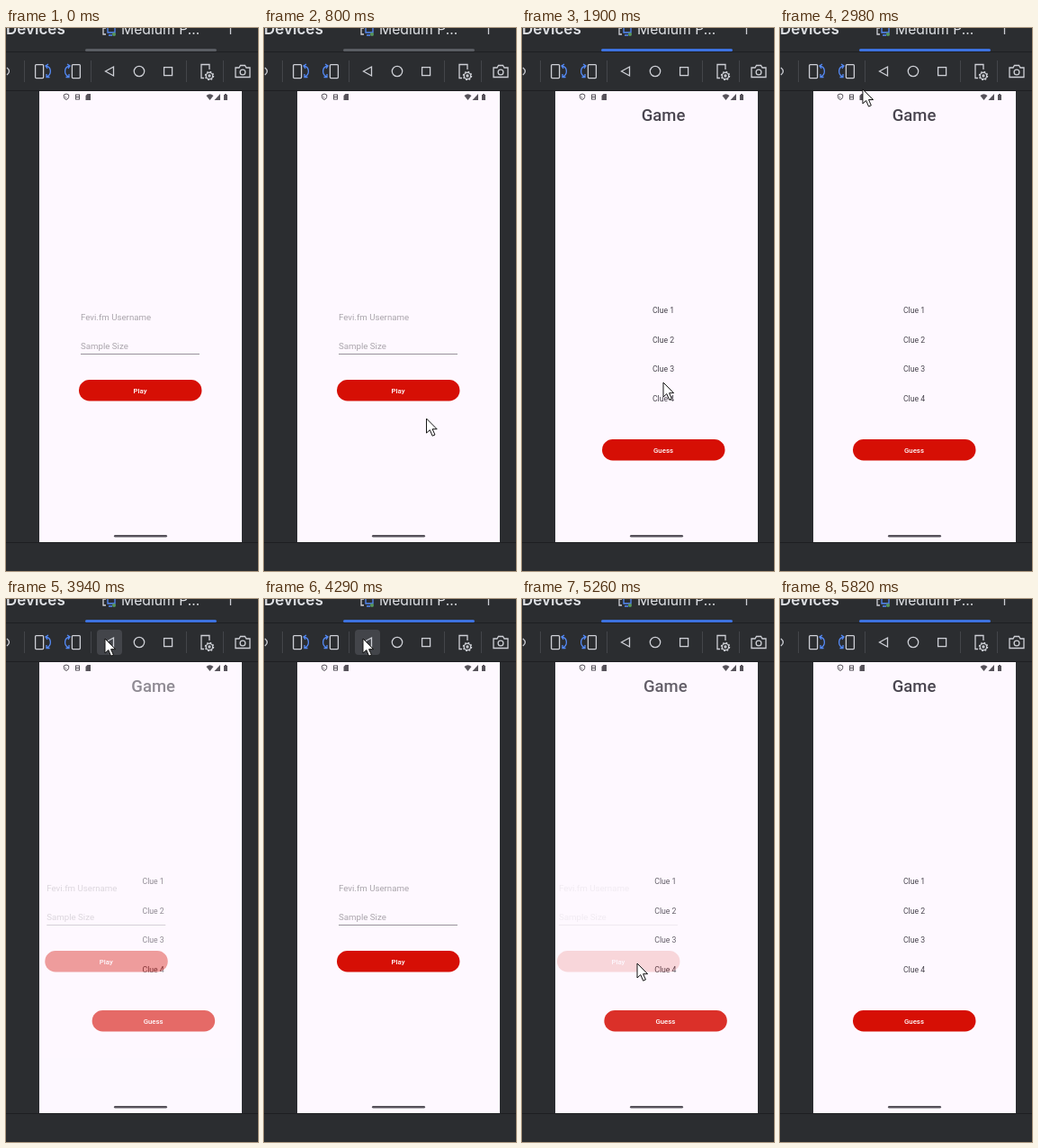
Write an HTML page that moves like this. It is 280 px wide and 602 px high and loops after 6.55 s.

```html
<!DOCTYPE html>
<html lang="en">
<head>
<meta charset="utf-8">
<title>Emulator demo</title>
<style>
  html, body { margin: 0; height: 100%; overflow: hidden; background: #2b2d30; }
  svg { display: block; }
  text { font-family: Roboto, "Noto Sans", sans-serif; }
  .ide { font-family: Inter, "Open Sans", sans-serif; fill: #dfe1e5; }
  .icon { fill: none; stroke: #ced0d6; stroke-width: 1.3; }
  .blue { stroke: #548af7; }
  .hint { font-size: 9.7px; fill: #aaa5ac; }
  .mid { text-anchor: middle; fill: #49454f; }
  .clue { font-size: 8.7px; }
  .label { font-size: 7.8px; font-weight: 500; fill: #fff; text-anchor: middle; }
  .button { fill: #d60f05; }
</style>
</head>
<body>
<svg width="280" height="602" viewBox="0 0 280 602">
  <defs>
    <clipPath id="screen"><rect x="37" y="70" width="225" height="500"/></clipPath>
  </defs>
  <rect width="280" height="602" fill="#2b2d30"/>

  <!-- Tab strip -->
  <text class="ide" x="0" y="7" font-size="17" font-weight="600">Devices</text>
  <text class="ide" x="128" y="7" font-size="15.7">Medium P...</text>
  <g class="icon">
    <path d="M111 0H108V7H111M249.5 0V7"/>
    <path class="blue" d="M113 0V5H121V0M114 8H118"/>
  </g>
  <circle cx="120" cy="7" r="2" fill="#57965c"/>
  <rect id="tabLine" x="88" y="23" width="146" height="3" rx="1.5"/>
  <path d="M0 26.5H280M0 69.5H280M0 570.5H280" stroke="#1e1f22"/>

  <!-- Toolbar -->
  <g fill="#43454a">
    <rect id="hoverRotate" x="60" y="34" width="28" height="28" rx="4"/>
    <rect id="hoverBack" x="101" y="34" width="28" height="28" rx="4"/>
  </g>
  <path d="M20.5 36V60M94.5 36V60M200.5 36V60M241.5 36V60" stroke="#43454a"/>
  <g class="icon">
    <path d="M1 44Q6 48 1 52"/>
    <rect x="32.6" y="40.6" width="9" height="15" rx="1"/>
    <rect x="73.4" y="40.6" width="9" height="15" rx="1"/>
    <path class="blue" d="M44 42C51 43 51 52 45 54M47 40L44 42L46 45M45 51V54.5H48.500"/>
    <path class="blue" d="M71 42C64 43 64 52 70 54M68 40L71 42L69 45M70 51V54.5H66.500"/>
    <path d="M119.500 43V53L110.500 48Z"/>
    <circle cx="148" cy="48" r="5.700"/>
    <rect x="175.600" y="43.600" width="9" height="9"/>
    <path d="M220 55.500H217V40.500H226V46"/>
    <circle cx="226" cy="53" r="3.700"/>
    <circle cx="226" cy="53" r="1"/>
    <circle cx="226" cy="53" r="4.600" stroke-dasharray="1.800 1.800"/>
    <path d="M255 44H259L260.500 41.500H265.500L267 44H271V54.500H255Z"/>
    <circle cx="263" cy="49" r="2.900"/>
  </g>

  <!-- Phone -->
  <g clip-path="url(#screen)">
    <rect x="37" y="70" width="225" height="500" fill="#fef8ff"/>
    <g id="playPage">
      <text class="hint" x="83" y="323.500">Fevi.fm Username</text>
      <text class="hint" x="83" y="356">Sample Size</text>
      <path d="M83 361.500H215" stroke="#98939b"/>
      <rect class="button" x="81" y="390" width="136.500" height="23.500" rx="11.750"/>
      <text class="label" x="149" y="404.700">Play</text>
    </g>
    <g id="gameLayer">
      <rect x="37" y="70" width="225" height="500" fill="#fef8ff"/>
      <g id="gamePage">
        <text class="mid" x="149" y="103" font-size="18.500" font-weight="500">Game</text>
        <text class="mid clue" x="149" y="316">Clue 1</text>
        <text class="mid clue" x="149" y="348.700">Clue 2</text>
        <text class="mid clue" x="149" y="381.400">Clue 3</text>
        <text class="mid clue" x="149" y="414">Clue 4</text>
        <rect class="button" x="81" y="456" width="136.500" height="23.500" rx="11.750"/>
        <text class="label" x="149" y="470.500">Guess</text>
      </g>
    </g>
    <g fill="none" stroke="#56525a">
      <path d="M67 73L69.700 74V76.500Q69.500 78.500 67 79.500Q64.500 78.500 64.300 76.500V74ZM65.500 76L67 77.500"/>
      <rect x="77.500" y="74" width="4" height="5"/>
      <path d="M78 76.500H81"/>
    </g>
    <g fill="#56525a">
      <path d="M88.500 75L90.500 73H94V80H88.500Z"/>
      <path d="M222.500 75Q226.500 71.500 230.500 75L226.500 80Z"/>
      <path d="M238 73V80H231.500Z"/>
      <path d="M242 74H243V73H245V74H246V80H242Z"/>
      <rect x="120" y="562" width="59" height="2.600" rx="1.300"/>
    </g>
  </g>

  <g id="pointer">
    <path d="M0 0V16L3.800 12.600L6.600 19.200L9.400 18L6.600 11.700H11.600Z" fill="#fff" stroke="#111"/>
    <circle id="press" cy="1" r="15" fill="#ff0" fill-opacity=".47"/>
  </g>
</svg>
<script>
const LOOP = 6550, SLIDE = 450, SHIFT = 52.4;
const $ = id => document.getElementById(id);
const clamp = v => Math.min(1, Math.max(0, v));
const within = (t, a, b) => t >= a && t < b;
const show = (id, on) => $(id).style.display = on ? '' : 'none';

// Pointer stops: time, x, y
const stops = [
  [450, 220, 548], [660, 198, 480], [870, 172, 410], [990, 162, 388],
  [1080, 159, 392], [1150, 157, 393], [2520, 157, 393], [2700, 140, 290],
  [2850, 110, 140], [2980, 92, 68], [3120, 80, 44], [3340, 80, 44],
  [3600, 110, 44], [4400, 110, 44], [4560, 113, 150], [4690, 122, 340],
  [4800, 128, 404], [5740, 128, 404], [5750, 199, 526]
];

function pointerAt(t) {
  const i = stops.findIndex(s => s[0] > t);
  if (i < 0) return stops[stops.length - 1].slice(1);
  if (i === 0) return stops[0].slice(1);
  const [a, b] = [stops[i - 1], stops[i]];
  const k = (t - a[0]) / (b[0] - a[0]);
  return [1, 2].map(n => a[n] + (b[n] - a[n]) * k);
}

const cubic = (u, [a, b, c, d]) =>
  a * (1 - u) ** 3 + 3 * b * u * (1 - u) ** 2 + 3 * c * u * u * (1 - u) + d * u ** 3;

// Emphasized easing: a quick rise followed by a long settle
function emphasized(x) {
  const [xs, ys] = x < 1 / 6
    ? [[0, .05, .13333, 1 / 6], [0, 0, .06, .4]]
    : [[1 / 6, .20833, .25, 1], [.4, .82, 1, 1]];
  let lo = 0, hi = 1;
  for (let i = 0; i < 24; i++) {
    const u = (lo + hi) / 2;
    if (cubic(u, xs) < x) lo = u; else hi = u;
  }
  return cubic(lo, ys);
}

// Page changes: start, whether the game opens, fade delay
const slides = [[1763, true, 50], [3873, false, 35], [5140, true, 50]];

function drawPages(t) {
  let open = 0, alpha = 0;
  const slide = slides.filter(s => s[0] <= t).pop();
  if (slide) {
    const [start, opens, delay] = slide;
    const p = emphasized(clamp((t - start) / SLIDE));
    const fade = clamp((t - start - delay) / 83);
    open = opens ? p : 1 - p;
    alpha = opens ? fade : 1 - fade;
  }
  $('playPage').setAttribute('transform', `translate(${-SHIFT * open})`);
  $('gamePage').setAttribute('transform', `translate(${SHIFT * (1 - open)})`);
  $('gameLayer').setAttribute('opacity', alpha);
}

function draw(t) {
  drawPages(t);
  $('tabLine').setAttribute('fill', t < 1550 ? '#5a5d63' : '#3d72df');
  show('hoverRotate', within(t, 3050, 3390));
  show('hoverBack', within(t, 3450, 4450));
  show('pointer', within(t, 450, 5815));
  show('press', within(t, 1475, 1620) || within(t, 3600, 3735) || within(t, 4840, 4980));
  $('pointer').setAttribute('transform', `translate(${pointerAt(t)})`);
}

const begin = performance.now();
function tick() {
  draw((performance.now() - begin) % LOOP);
  requestAnimationFrame(tick);
}
tick();
</script>
</body>
</html>
```
